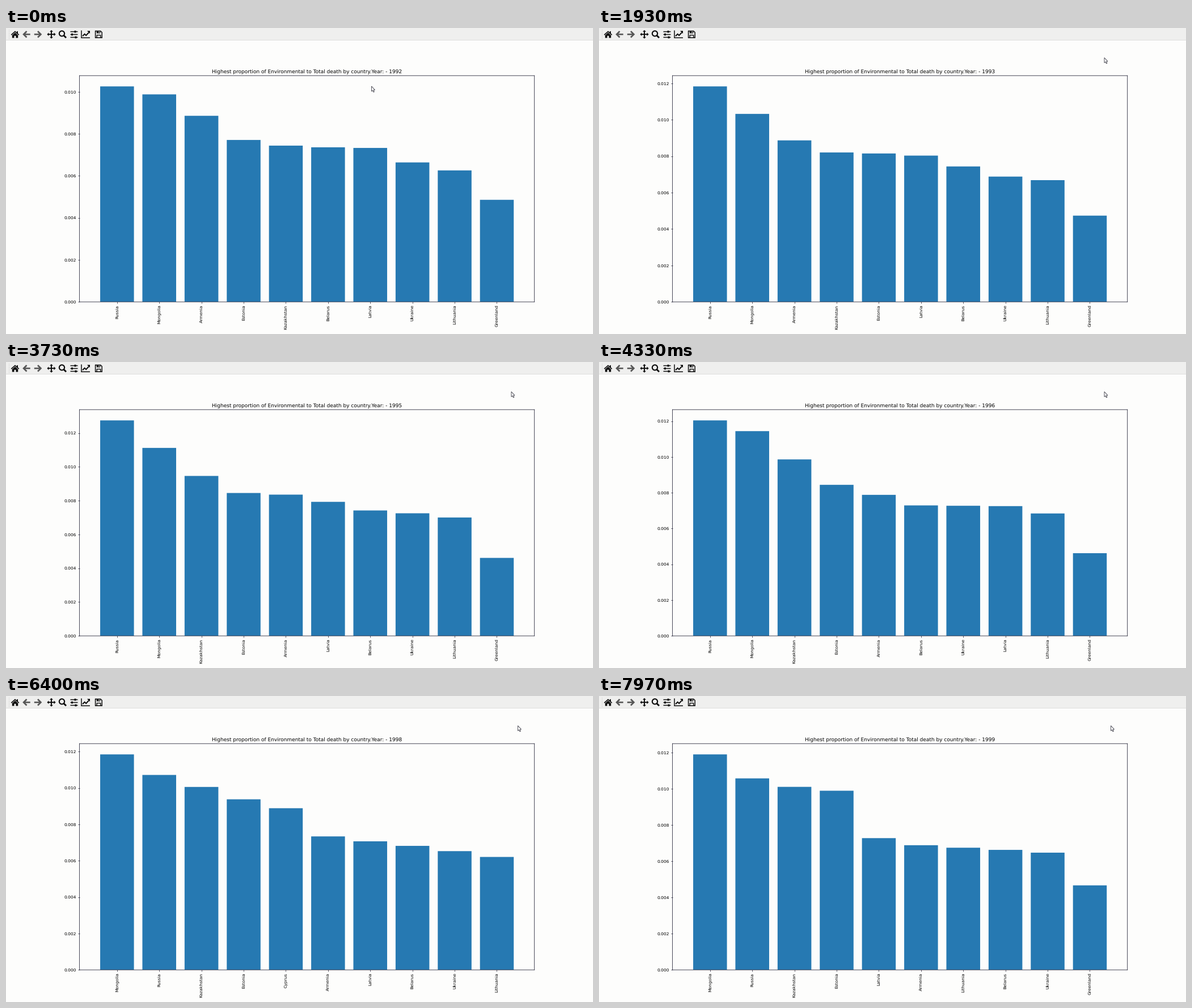
Animation, 1035 px wide and 541 px high, one loop 8000 ms. Source, as a matplotlib script:

```python
import matplotlib.pyplot as plt
import numpy as np
from matplotlib.animation import FuncAnimation
from matplotlib.patches import Circle, Polygon, Rectangle
from matplotlib.ticker import MultipleLocator

W, H, DPI = 1035, 541, 100
FRAMES, INTERVAL = 200, 40
SCALE = 0.539            # the plot window is shown at reduced size
PX = 72 / DPI            # points per pixel
LEFT, RIGHT, TOP, BOTTOM = 129.6, 931.7, 84.2, 484.2
PAPER, TOOLBAR, BAR = "#fdfdfc", "#efefee", "#2679b2"
EDGE, INK, GRAY = "#26263a", "#0c0c0c", "#565656"

FIRST_YEAR, YEAR_MS = 1992, 1050
# Shares in units of 1e-4 at every second year; a curve fills the years between.
SHARES = {
    "Russia":     (102.6, 129.6, 120.4, 107.2, 106.0),
    "Mongolia":   (98.8, 107.5, 114.4, 118.5, 119.3),
    "Armenia":    (88.6, 87.8, 78.8, 73.4, 63.9),
    "Estonia":    (77.1, 84.9, 84.4, 93.8, 104.4),
    "Kazakhstan": (74.4, 89.1, 98.6, 100.6, 101.6),
    "Belarus":    (73.6, 74.8, 72.9, 68.2, 64.6),
    "Latvia":     (73.3, 84.5, 72.5, 70.7, 75.8),
    "Ukraine":    (66.4, 70.9, 72.7, 65.3, 65.2),
    "Lithuania":  (62.6, 70.0, 68.4, 62.1, 75.4),
    "Greenland":  (48.6, 46.4, 46.2, 46.6, 46.8),
}
ONE_YEAR_ONLY = {1998: ("Cyprus", 88.9)}

# Pointer: starting place, then moves as (start ms, length ms, dx, dy).
POINTER_START = np.array([644.5, 103])
POINTER_MOVES = [(1150, 450, 246.5, -50.5), (5250, 300, 11.5, 0)]
ARROW = np.array([(0, 0), (0, 9), (2, 7.3), (3.4, 10.4),
                  (4.9, 9.8), (3.5, 6.7), (6, 6.5)])

plt.rcParams.update({
    "toolbar": "None",
    "font.family": "DejaVu Sans",
    "text.hinting": "none",
    "axes.edgecolor": EDGE,
})

fig = plt.figure(figsize=(W / DPI, H / DPI), dpi=DPI, facecolor=PAPER)
ax = fig.add_axes([LEFT / W, 1 - BOTTOM / H,
                   (RIGHT - LEFT) / W, (BOTTOM - TOP) / H], facecolor=PAPER)
ui = fig.add_axes([0, 0, 1, 1], zorder=5)
ui.set(xlim=(0, W), ylim=(H, 0))
ui.axis("off")


def shape(points, color=INK):
    ui.add_patch(Polygon(points, closed=True, fc=color, lw=0))


def box(x, y, w, h, color=INK):
    ui.add_patch(Rectangle((x, y), w, h, fc=color, lw=0, snap=False))


def stroke(points, width, color=INK, **style):
    xs, ys = zip(*points)
    ui.plot(xs, ys, color=color, lw=width * PX, snap=False,
            solid_capstyle="butt", solid_joinstyle="miter", **style)


def draw_home(cx):
    stroke([(cx - 6.8, 12.2), (cx, 6.2), (cx + 6.8, 12.2)], 1.6)
    shape([(cx - 5.2, 12.8), (cx, 8.2), (cx + 5.2, 12.8)])
    box(cx + 3, 5.8, 2, 4)
    for x in (cx - 5.2, cx + 1.5):
        box(x, 12.6, 3.7, 4.9)
    box(cx - 2, 12, 4, 1.8)


def draw_nav_arrow(cx, way):
    """Arrow pointing left for way = -1, right for way = 1."""
    tip = cx + 5.4 * way
    stroke([(tip - 5.4 * way, 5.8), (tip, 11.2), (tip - 5.4 * way, 16.6)],
           2.7, GRAY)
    stroke([(tip - way, 11.2), (cx - 6.2 * way, 11.2)], 2.6, GRAY)


def draw_pan(cx, cy):
    for dx, dy in [(1, 0), (-1, 0), (0, 1), (0, -1)]:
        stroke([(cx, cy), (cx + 6 * dx, cy + 6 * dy)], 2)
        bx, by = cx + 4.6 * dx, cy + 4.6 * dy
        shape([(cx + 7.6 * dx, cy + 7.6 * dy),
               (bx + 3 * dy, by + 3 * dx), (bx - 3 * dy, by - 3 * dx)])


def draw_zoom(cx, cy):
    ui.add_patch(Circle((cx, cy), 4.6, fc="none", ec=INK, lw=2.1 * PX))
    stroke([(cx + 3.1, cy + 3.1), (cx + 7.5, cy + 7.5)], 2.8)


def draw_sliders(cx):
    for row, shift in enumerate((2, -3.5, 3)):
        y = 6.5 + 5 * row
        stroke([(cx - 6.5, y), (cx + 6.5, y)], 1.5)
        box(cx + shift - 1.5, y - 1.8, 3, 3.6)


def draw_chart(x, y):
    stroke([(x, y - 13), (x, y), (x + 15, y)], 1.5)
    stroke([(x + 2, y - 3), (x + 5.6, y - 6.6), (x + 8.2, y - 4.2),
            (x + 13, y - 9.4)], 2)
    shape([(x + 10, y - 12), (x + 14.5, y - 12), (x + 14.5, y - 7.4)])


def draw_save(x, y):
    stroke([(x, y), (x + 9.2, y), (x + 11.6, y + 2.4), (x + 11.6, y + 11.8),
            (x, y + 11.8), (x, y - 0.7)], 1.5)
    box(x + 2.2, y, 6.4, 4)
    box(x + 5.8, y + 0.6, 1.6, 2.4, TOOLBAR)
    stroke([(x + 2.6, y + 11.6), (x + 2.6, y + 7.2),
            (x + 9.1, y + 7.2), (x + 9.1, y + 11.6)], 1.4)


def draw_toolbar():
    box(0, 0, W, 21, TOOLBAR)
    box(0, 21, W, 1, "#dededd")
    stroke([(5.5, 3), (5.5, 20)], 1, "#cfcfcf", ls=(0, (1.5, 1.5)))
    draw_home(16)
    draw_nav_arrow(36.5, -1)
    draw_nav_arrow(56, 1)
    draw_pan(80, 11.2)
    draw_zoom(98.5, 9.8)
    draw_sliders(120)
    draw_chart(133, 17.3)
    draw_save(157.6, 5.4)


def curve(keys, pos):
    """Catmull-Rom curve through evenly spaced keys, ends reflected."""
    pts = [2 * keys[0] - keys[1], *keys, 2 * keys[-1] - keys[-2]]
    i = min(int(pos), len(keys) - 2)
    u = pos - i
    a, b, c, d = pts[i:i + 4]
    return b + 0.5 * u * (c - a + u * (2 * a - 5 * b + 4 * c - d
                                       + u * (3 * (b - c) + d - a)))


def ranking(year):
    rows = [(name, curve(keys, (year - FIRST_YEAR) / 2))
            for name, keys in SHARES.items()]
    if year in ONE_YEAR_ONLY:
        rows.append(ONE_YEAR_ONLY[year])
    rows.sort(key=lambda row: -row[1])
    return [(name, share * 1e-4) for name, share in rows[:10]]


def pointer_at(ms):
    place = POINTER_START.copy()
    for start, length, dx, dy in POINTER_MOVES:
        u = np.clip((ms - start) / length, 0, 1)
        place += np.array([dx, dy]) * u * u * (3 - 2 * u)
    return place


draw_toolbar()
pointer = ui.add_patch(Polygon(ARROW, closed=True, fc="white", ec="#45454f",
                               lw=0.9 * PX))
bars = ax.bar(range(10), [0] * 10, color=BAR, snap=False)
ax.set_xlim(-0.89, 9.89)
ax.set_xticks(range(10), [""] * 10, rotation=90)
ax.yaxis.set_major_locator(MultipleLocator(0.002))
ax.yaxis.set_major_formatter("{x:.3f}")
ax.tick_params(labelsize=10 * SCALE, length=3.5 * SCALE, pad=3.5 * SCALE,
               width=0.8 * PX, color=EDGE)
for spine in ax.spines.values():
    spine.set(linewidth=0.85 * PX, snap=False)
title = ax.set_title("", fontsize=12 * SCALE, pad=6 * SCALE)


def update(frame):
    ms = frame * INTERVAL
    year = FIRST_YEAR + ms // YEAR_MS
    rows = ranking(year)
    for bar, (_, share) in zip(bars, rows):
        bar.set_height(share)
    ax.set_ylim(0, rows[0][1] * 1.05)
    ax.set_xticklabels([name for name, _ in rows])
    title.set_text("Highest proportion of Environmental to Total death "
                   f"by country.Year: - {year}")
    pointer.set_xy(ARROW + pointer_at(ms))
    return [*bars, title, pointer]


anim = FuncAnimation(fig, update, frames=FRAMES, interval=INTERVAL,
                     repeat=True, repeat_delay=0, blit=False)
plt.show()
```
